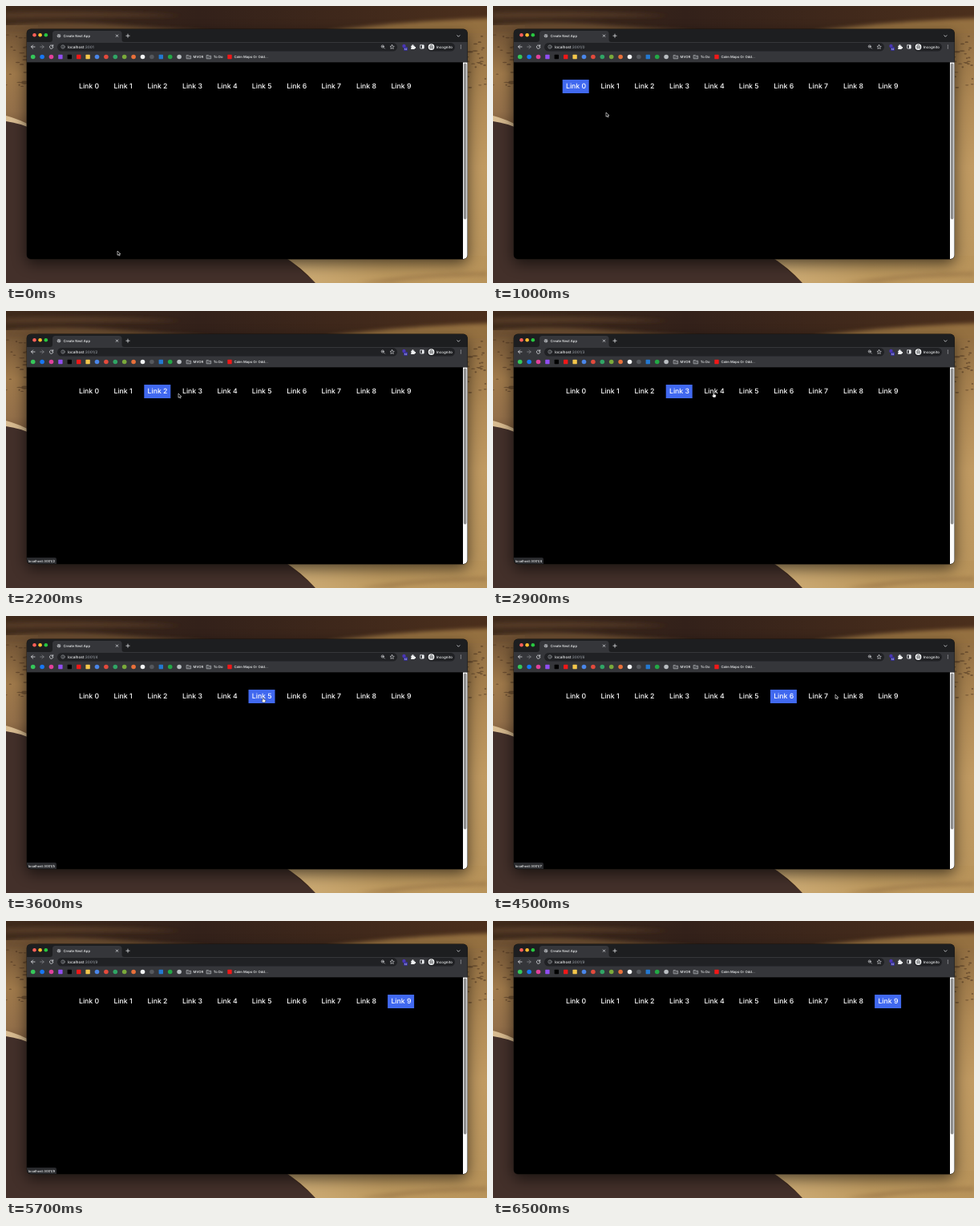
These frames come from a looping animation (600x346 px, 6.6 s). An HTML page:

```html
<!DOCTYPE html>
<html lang="en">
<head>
<meta charset="utf-8">
<title>Link navigation</title>
<style>
  html, body { margin: 0; width: 100%; height: 100%; overflow: hidden; background: #000; }
  svg { display: block; width: 100vw; height: 100vh; }
  text { font-family: Inter, Roboto, sans-serif; font-weight: 500; fill: #f1f3f4; white-space: pre; text-rendering: geometricPrecision; }
  .line { fill: none; stroke: #dfe1e5; stroke-width: .8; stroke-linecap: round; stroke-linejoin: round; }
  .ui { font-size: 4.25px; }
  .link { font-size: 8.7px; font-weight: 450; fill: #fff; }
</style>
</head>
<body>
<svg id="stage" viewBox="0 0 600 346" xmlns="http://www.w3.org/2000/svg">
  <defs>
    <linearGradient id="ridge">
      <stop offset="0" stop-color="#3f2a1b"/>
      <stop offset=".4" stop-color="#33211a"/>
      <stop offset="1" stop-color="#4b2f1c"/>
    </linearGradient>
    <linearGradient id="leftSand" x2="0" y2="1">
      <stop offset="0" stop-color="#6d5033"/>
      <stop offset=".45" stop-color="#a07a4b"/>
      <stop offset=".8" stop-color="#94704a"/>
      <stop offset="1" stop-color="#755538"/>
    </linearGradient>
    <linearGradient id="rightSand" x2="0" y2="1">
      <stop offset="0" stop-color="#8f6c40"/>
      <stop offset=".3" stop-color="#b08a55"/>
      <stop offset=".55" stop-color="#c09a62"/>
      <stop offset="1" stop-color="#b8945c"/>
    </linearGradient>
    <linearGradient id="foreSand">
      <stop offset="0" stop-color="#cfae78"/>
      <stop offset=".5" stop-color="#bd995f"/>
      <stop offset="1" stop-color="#b8935a"/>
    </linearGradient>
    <filter id="soft" x="-20%" y="-40%" width="140%" height="180%"><feGaussianBlur stdDeviation="2.5"/></filter>
    <filter id="shadow" x="-10%" y="-15%" width="120%" height="130%"><feGaussianBlur stdDeviation="9"/></filter>
    <clipPath id="frame"><rect x="26" y="29" width="549.5" height="287" rx="5"/></clipPath>
  </defs>

  <g id="desert">
    <rect width="600" height="346" fill="url(#ridge)"/>
    <rect y="24" width="40" height="135" fill="url(#leftSand)"/>
    <rect x="560" y="24" width="40" height="322" fill="url(#rightSand)"/>
    <g filter="url(#soft)">
      <path d="M0 25 Q60 18 140 24 L260 32 H0Z" fill="#6d5033"/>
      <path d="M400 32 Q480 20 610 15 V34 H400Z" fill="#94703f"/>
      <path d="M0 9 Q90 5 220 12 Q120 14 0 15Z" fill="#553a25"/>
    </g>
    <g id="rocks" fill="#4c3420" opacity=".55"></g>
    <path d="M0 137 Q16 141 34 151 V160 L0 146Z" fill="#d8bb90"/>
    <path d="M0 144 Q16 146 34 154 L350 314 L386 346 H0Z" fill="#43302a"/>
    <path d="M345 312 H600 V346 H386 Q368 326 345 312Z" fill="url(#foreSand)"/>
    <path d="M440 346 Q500 334 600 332 V337 Q520 338 480 346Z" fill="#7d5a34" opacity=".35" filter="url(#soft)"/>
  </g>

  <rect x="25" y="36" width="551" height="286" rx="8" fill="#000" opacity=".6" filter="url(#shadow)"/>
  <rect x="25.6" y="28.6" width="550.3" height="287.8" rx="5.4" fill="#15120f"/>

  <g clip-path="url(#frame)">
    <rect x="26" y="29" width="550" height="17" fill="#1d1e20"/>
    <path d="M26 45 H55 Q58 45 58 42 V34.5 Q58 31 61.500 31 H141 Q144.500 31 144.500 34.500 V42 Q144.500 45 147.500 45 H576 V70.500 H26Z" fill="#35363a"/>
    <rect x="64" y="46" width="424" height="10.400" rx="5.200" fill="#202124"/>
    <rect x="525" y="46" width="35" height="10.400" rx="5.200" fill="#202124"/>
    <rect x="26" y="70.500" width="544" height="246" fill="#000"/>
    <rect x="570" y="70.500" width="6" height="246" fill="#fafafa"/>
    <rect x="570.900" y="71.500" width="3.500" height="195" rx="1.700" fill="#8e8e8e"/>
    <g id="links"></g>
    <g id="status">
      <path d="M26 308 H61 Q63 308 63 310 V316 H26Z" fill="#292a2d"/>
      <text id="statusText" x="27.800" y="313.500" font-size="4.200"></text>
    </g>
  </g>

  <g id="tabBar">
    <circle cx="35.500" cy="36.200" r="2.300" fill="#ff5f57"/>
    <circle cx="42.600" cy="36.200" r="2.300" fill="#febc2e"/>
    <circle cx="49.800" cy="36.200" r="2.300" fill="#28c840"/>
    <circle cx="66" cy="37.200" r="2.300" fill="#a9abaf"/>
    <path class="line" style="stroke:#54565a;stroke-width:.5" d="M64.300 36.500 L66 37.300 L65.500 38.800 M66.500 35.500 L67.500 37"/>
    <text class="ui" x="71.500" y="39">Create Next App</text>
    <path class="line" d="M137.300 36 l2.400 2.400 m0 -2.400 l-2.400 2.400 M149.900 37.200 h4.200 m-2.100 -2.100 v4.200 M562.800 36.700 l1.600 1.600 l1.600 -1.600"/>
  </g>

  <g id="toolbar">
    <path class="line" d="M36 51 H31.500 m2.100 -2.100 l-2.100 2.100 l2.100 2.100"/>
    <path class="line" style="stroke:#85878b" d="M42.700 51 H47.200 m-2.100 -2.100 l2.100 2.100 l-2.100 2.100"/>
    <path class="line" d="M58.300 49.700 A2.200 2.200 0 1 0 58.800 51.400 M58.700 48.600 V50.200 H57.100"/>
    <circle class="line" cx="71" cy="51" r="2.200" style="stroke:#a5a8ad;stroke-width:.6"/>
    <path class="line" style="stroke:#a5a8ad;stroke-width:.6" d="M71 50.800 V52.200 M71 49.700 V49.800"/>
    <text x="77" y="52.700" font-size="4.700">localhost<tspan id="urlTail" fill="#8f959b"></tspan></text>
    <circle class="line" cx="469.800" cy="50.500" r="1.600" style="stroke-width:.6"/>
    <path class="line" style="stroke-width:.6" d="M471 51.700 l1.400 1.400 M469.100 50.500 h1.400"/>
    <path class="line" style="stroke-width:.6" d="M481.600 48.500 l.8 1.700 l1.800 .2 l-1.300 1.300 l.3 1.800 l-1.600 -.9 l-1.600 .9 l.3 -1.800 l-1.300 -1.300 l1.800 -.2Z"/>
    <circle cx="496.500" cy="50" r="2.200" fill="#4a35b5"/>
    <rect x="496" y="51.200" width="5" height="4.500" rx="1" fill="#3730a3"/>
    <text x="496.900" y="54.700" font-size="3">12</text>
    <path fill="#f1f3f4" d="M505.200 49.700 h1.300 a1 1 0 1 1 1.800 0 h1.400 v1.400 a1 1 0 1 1 0 1.800 v1 h-4.500 v-1.300 a.9 .9 0 0 0 0 -1.600Z"/>
    <rect class="line" x="516.700" y="48.800" width="4.500" height="4.300" rx=".4"/>
    <rect x="519" y="48.800" width="2.200" height="4.300" fill="#f1f3f4"/>
    <circle cx="530.500" cy="51.100" r="3.900" fill="#f1f3f4"/>
    <path class="line" style="stroke:#35363a;stroke-width:.6" d="M528.300 50.700 h4.400 M529.500 49.700 l.4 -1.100 h1.300 l.4 1.100"/>
    <circle class="line" cx="529.400" cy="52.300" r=".8" style="stroke:#35363a;stroke-width:.5"/>
    <circle class="line" cx="531.600" cy="52.300" r=".8" style="stroke:#35363a;stroke-width:.5"/>
    <text x="536.800" y="52.700" font-size="4.500">Incognito</text>
    <path class="line" style="stroke-width:1" d="M567.400 49.100 v.01 M567.400 51 v.01 M567.400 52.900 v.01"/>
  </g>

  <g id="bookmarks">
    <path class="line" style="stroke:#b4b6ba;fill:#55575b;stroke-width:.7" d="M225.500 61.500 h2 l.8 .8 h2.400 v3.500 h-5.200Z M250.500 61.500 h2 l.8 .8 h2.400 v3.500 h-5.200Z"/>
    <text class="ui" x="233.500" y="65.200">MVOR</text>
    <text class="ui" x="258.800" y="65.200">To Do</text>
    <text class="ui" x="284.500" y="65.200">Calm Maps Or Odd...</text>
  </g>

  <g id="cursor">
    <path id="arrow" d="M0 0 V5.300 L1.250 4.200 L2.100 6 L3.100 5.500 L2.300 3.800 H3.900Z" fill="#000" stroke="#fff" stroke-width=".6"/>
    <path id="hand" d="M-.7 .4 Q0 -.5 .6 .4 V2 L2.500 2.500 Q3.300 2.900 3.100 3.800 L2.500 5.900 H-.4 L-2 3.700 Q-1.700 2.900 -.7 3.600Z" fill="#fff" stroke="#111" stroke-width=".45"/>
  </g>
</svg>

<script>
const LOOP = 6600, TICK = 100, URL_DELAY = 120, HIDE_CURSOR = 5600, HIDE_STATUS = 5900;
const BOX = { y: 92, width: 33, height: 17, pad: 4.3 };

// [time, x, y] of the pointer tip
const path = [
  [0, 139, 306], [200, 138, 300], [600, 104, 102], [750, 104, 102],
  [1000, 141, 133], [1350, 145, 101], [1600, 146, 101], [1850, 188, 101],
  [2050, 189, 101], [2200, 215, 103], [2380, 232, 102], [2580, 233, 102],
  [2850, 275, 102], [3080, 276, 102], [3400, 320, 102], [3700, 321, 102],
  [3950, 363, 101], [4250, 365, 101], [4500, 427, 98], [4700, 447, 100],
  [5000, 449, 100], [5280, 490, 101]
];
// [time, link]
const clicks = [[700, 0], [1500, 1], [1980, 2], [2460, 3], [2980, 4],
                [3540, 5], [4080, 6], [4780, 8], [5380, 9]];

const $ = id => document.getElementById(id);

function add(parent, tag, attrs, text = "") {
  const node = document.createElementNS("http://www.w3.org/2000/svg", tag);
  for (const key in attrs) node.setAttribute(key, attrs[key]);
  node.textContent = text;
  return $(parent).appendChild(node);
}

const show = (node, visible) => node.setAttribute("visibility", visible ? "visible" : "hidden");

// Links after "Link 1" sit closer, since its digit is narrow.
const linkX = i => 91 + 43.4 * i - (i > 1 ? 1.2 : 0);

const highlight = add("links", "rect", { y: BOX.y, width: BOX.width, height: BOX.height, fill: "#4169f0" });
for (let i = 0; i < 10; i++) {
  add("links", "text", { class: "link", x: linkX(i), y: 103.2 }, "Link " + i);
}

const icons = ["#35c759", "#1877f2", "#e0409a", "#8f4df0", "#000", "#f01818", "#f3c64b", "#4a86e8",
  "#e34a3c", "#30a565", "#79a93b", "#e8703a", "#f1f3f4", "#55585d", "#2478d0", "#22a845", "#b9bdc1"];
const squares = [3, 4, 5, 6, 14];
icons.forEach((fill, i) => {
  const x = 33.7 + 11.4 * i;
  if (squares.includes(i)) add("bookmarks", "rect", { x: x - 2.7, y: 60.8, width: 5.4, height: 5.4, rx: 0.6, fill });
  else add("bookmarks", "circle", { cx: x, cy: 63.5, r: 2.8, fill });
});
add("bookmarks", "rect", { x: 276.3, y: 60.8, width: 5.4, height: 5.4, rx: 0.6, fill: "#f01818" });

let seed = 7;
const random = () => (seed = seed * 16807 % 2147483647) / 2147483647;
for (let i = 0; i < 50; i++) {
  const side = i % 2 ? 574 : 0;
  add("rocks", "ellipse", {
    cx: side + 26 * random(), cy: 36 + 68 * random(),
    rx: 1 + 2.5 * random(), ry: 0.5 + 0.7 * random()
  });
}

function pointer(t) {
  const next = path.findIndex(p => p[0] > t);
  if (next < 0) return path[path.length - 1].slice(1);
  const [t0, x0, y0] = path[next - 1], [t1, x1, y1] = path[next];
  const u = (t - t0) / (t1 - t0), ease = u * u * (3 - 2 * u);
  return [x0 + (x1 - x0) * ease, y0 + (y1 - y0) * ease];
}

function hovered(t) {
  const [x, y] = pointer(Math.max(0, t));
  if (y < BOX.y || y > BOX.y + BOX.height) return -1;
  for (let i = 0; i < 10; i++) {
    const left = linkX(i) - BOX.pad;
    if (x >= left && x <= left + BOX.width) return i;
  }
  return -1;
}

function clicked(t) {
  const past = clicks.filter(c => c[0] <= t);
  return past.length ? past[past.length - 1][1] : -1;
}

function draw(time) {
  const t = Math.floor((time % LOOP) / TICK) * TICK;

  const active = clicked(t);
  show(highlight, active >= 0);
  highlight.setAttribute("x", linkX(Math.max(0, active)) - BOX.pad);

  const page = clicked(t - URL_DELAY);
  $("urlTail").textContent = ":3001" + (page < 0 ? "" : "/" + page);

  // The status bubble lingers for one tick after leaving a link.
  const over = hovered(t);
  const target = over >= 0 ? over : hovered(t - TICK);
  show($("status"), target >= 0 && t < HIDE_STATUS);
  $("statusText").textContent = "localhost:3001/" + target;

  const [x, y] = pointer(t), visible = t < HIDE_CURSOR;
  $("cursor").setAttribute("transform", `translate(${x} ${y})`);
  show($("arrow"), visible && over < 0);
  show($("hand"), visible && over >= 0);
}

const start = performance.now();
function loop() {
  draw(performance.now() - start);
  requestAnimationFrame(loop);
}
draw(0);
requestAnimationFrame(loop);
</script>
</body>
</html>
```
